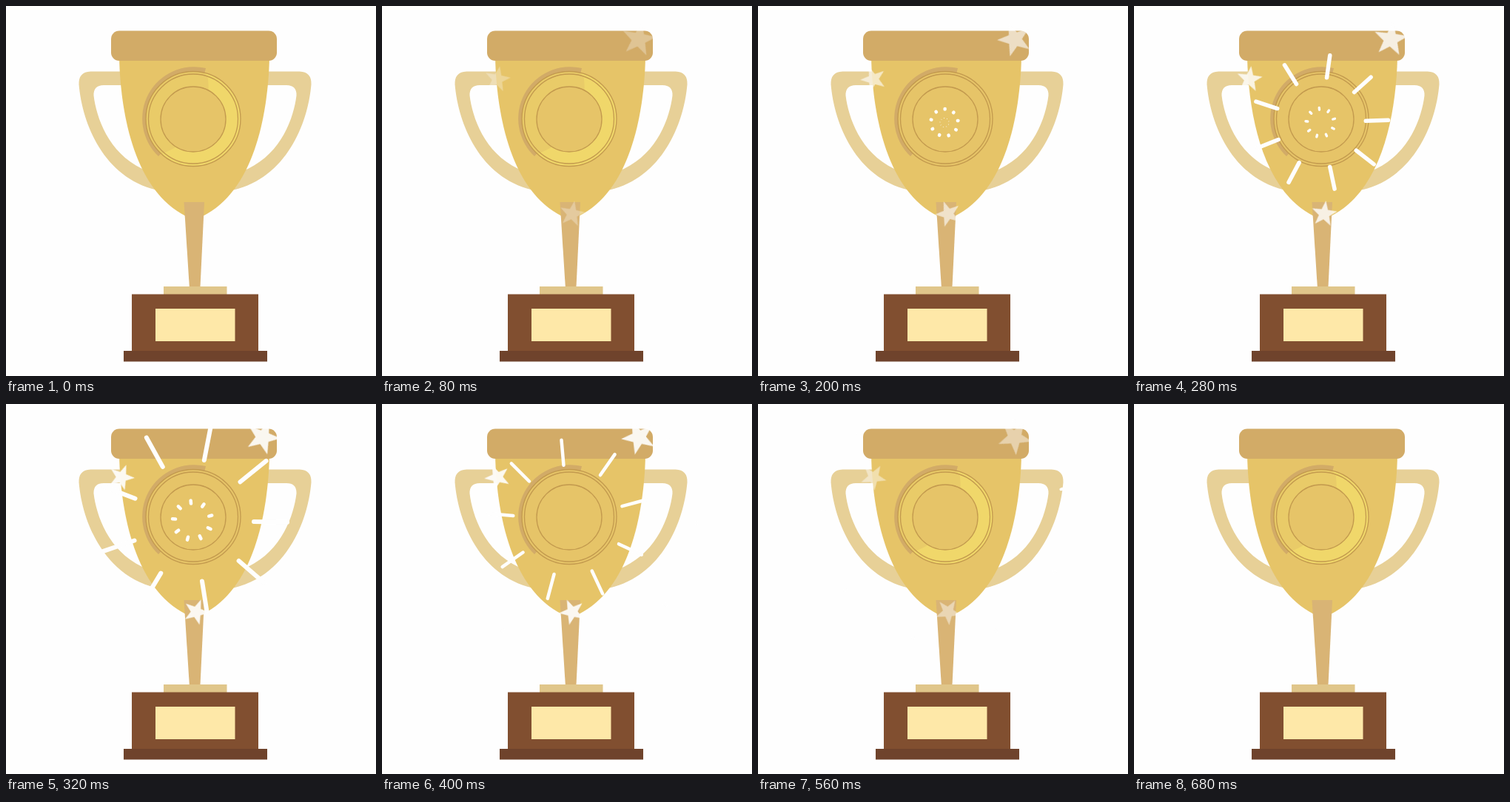
Write an HTML page that moves like this. It is 500 by 500 pixels and loops after 2.08 s.

```html
<!DOCTYPE html>
<html lang="en">
<head>
<meta charset="utf-8">
<title>Trophy</title>
<style>
  html, body { margin: 0; width: 100%; height: 100%; overflow: hidden; background: #fefefe; }
  svg { display: block; width: 100%; height: 100%; }
</style>
</head>
<body>
<svg viewBox="0 0 500 500">
  <defs>
    <path id="handle" fill="#e7d097" d="M160 88.500H114Q98 89 98.500 106C103 160 133 232 203 248.500L215 232L184 220C138 198 122 150 118.500 121Q118 107 132 107H160Z"/>
    <polygon id="star"/>
  </defs>

  <use href="#handle"/>
  <use href="#handle" transform="matrix(-1 0 0 1 511 0)"/>
  <path fill="#e6c468" d="M153 70C155 150 175 250 243 284H266C334 250 354 150 356 70Z"/>
  <rect x="142" y="33.500" width="224" height="40.500" rx="11" fill="#d2ab67"/>

  <path fill="#d9b475" d="M240.500 265H268L262 390H248.500Z"/>
  <rect x="213" y="379" width="85.500" height="11" fill="#e0c68a"/>
  <rect x="170" y="389.500" width="171" height="77" fill="#814f30"/>
  <rect x="202" y="409" width="107.500" height="44" fill="#fee8a8"/>
  <rect x="159" y="466" width="194" height="14.500" fill="#6f432c"/>

  <!-- medal -->
  <path fill="#d2ab67" d="M270 84A70 70 0 0 0 206 203L253 152Z"/>
  <circle cx="253" cy="152.500" r="64" fill="#e6c468"/>
  <g id="shine">
    <circle cx="253" cy="152.500" r="64" fill="#f0d76a"/>
    <path fill="#e9cb68" d="M268 90.300A64 64 0 0 0 210 200Q280 173 273 98Z"/>
  </g>
  <g stroke="#c39a4e" stroke-width="1.300" fill="none">
    <circle cx="253" cy="152.500" r="64"/>
    <circle cx="253" cy="152.500" r="60.500"/>
    <circle cx="253" cy="153" r="44" fill="#e6c468"/>
  </g>

  <g stroke="#fefefe" stroke-linecap="round">
    <path id="early"/>
    <path id="late"/>
  </g>
  <g id="stars" fill="#fefefe"></g>
</svg>
<script>
const LOOP = 2080, STEP = 40;
const $ = id => document.getElementById(id);
const clamp = v => Math.max(0, Math.min(1, v));
const polar = (r, deg, x = 0, y = 0) => {
  const a = deg * Math.PI / 180;
  return `${(x + r * Math.cos(a)).toFixed(2)} ${(y + r * Math.sin(a)).toFixed(2)}`;
};

$('star').setAttribute('points',
  Array.from({ length: 10 }, (_, i) => polar(i % 2 ? 0.41 : 1, i * 36)).join(' '));

const stars = [[347, 45, 24], [156, 99, 18], [257, 281, 18]].map(place => {
  const el = document.createElementNS('http://www.w3.org/2000/svg', 'use');
  el.setAttribute('href', '#star');
  $('stars').append(el);
  return { el, place };
});

// Each key: time, inner radius, outer radius, line width
const bursts = [
  { el: $('early'), angle: -79, drift: -9, keys: [[120, 5, 5, 1], [200, 18, 18.5, 4.5], [320, 83, 128, 6], [400, 172, 174, 4]] },
  { el: $('late'), angle: -95, drift: 0, keys: [[200, 6, 6, 1], [320, 23, 27, 4.5], [400, 75, 109, 4.5], [560, 163, 165, 4]] }
];

function keyed(keys, t) {
  const i = keys.findIndex(k => k[0] > t);
  if (i < 1) return t === keys.at(-1)[0] ? keys.at(-1) : null;
  const a = keys[i - 1], b = keys[i], p = (t - a[0]) / (b[0] - a[0]);
  return a.map((v, j) => v + (b[j] - v) * p);
}

function drawBurst({ el, angle, drift, keys }, t) {
  const now = keyed(keys, t);
  let d = '';
  if (now) {
    const [, inner, outer, width] = now;
    const start = angle + drift * clamp((320 - t) / 120);
    for (let i = 0; i < 9; i++) {
      const a = start + i * 40;
      d += `M${polar(inner, a, 252, 157.5)}L${polar(outer + 0.1, a, 252, 157.5)}`;
    }
    el.setAttribute('stroke-width', width);
  }
  el.setAttribute('d', d);
}

function draw(t) {
  $('shine').setAttribute('visibility', t >= 120 && t < 520 ? 'hidden' : 'visible');
  bursts.forEach(b => drawBurst(b, t));
  const glow = clamp(Math.min(t / 320, (680 - t) / 280));
  $('stars').setAttribute('opacity', 0.91 * glow ** 0.8);
  const turn = 37 + t * 0.344;
  for (const { el, place: [x, y, r] } of stars)
    el.setAttribute('transform', `translate(${x} ${y}) rotate(${turn}) scale(${r})`);
}

function tick() {
  draw(Math.floor(performance.now() % LOOP / STEP) * STEP);
  requestAnimationFrame(tick);
}
tick();
</script>
</body>
</html>
```
